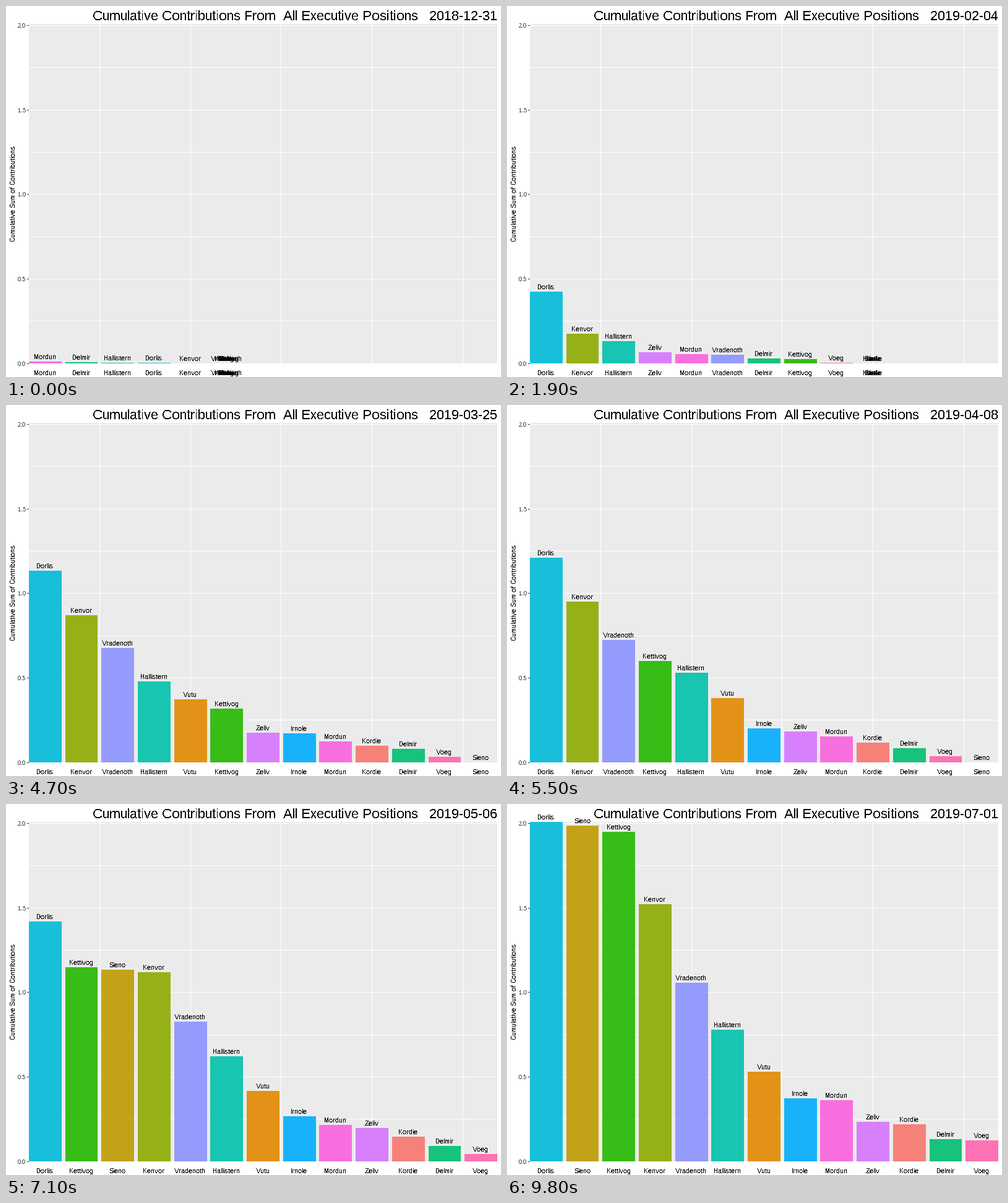
A matplotlib script that plays this animation: 800x600 px, repeating every 10000 ms.

```python
import numpy as np
import matplotlib.pyplot as plt
from matplotlib.animation import FuncAnimation
from matplotlib.patches import Rectangle

plt.rcParams.update({
    "font.family": "Liberation Sans",
    "text.hinting": "native",
    "text.hinting_factor": 1,
    "text.kerning_factor": 6,
    "text.antialiased": False,
    "toolbar": "None",
})

W, H, DPI = 800, 600, 72
LEFT, RIGHT, TOP, BASE = 37, 794, 29, 578
UNIT_X = (RIGHT - LEFT) / 12.9
UNIT_Y = 273.45
LAST_WEEK = 26

# Totals at a few key weeks, in drawing order.
KEY_WEEKS = (0, 5, 8, 12, 16, 22, 25)
CANDIDATES = {
    "Kordie": ("#F8766D", (0, 0, .049, .099, .135, .169, .220)),
    "Vutu": ("#E18A00", (0, 0, 0, .373, .391, .472, .531)),
    "Sieno": ("#BE9C00", (0, 0, 0, 0, .661, 1.548, 1.986)),
    "Kenvor": ("#8CAB00", (.001, .176, .446, .870, 1.035, 1.287, 1.521)),
    "Kettivog": ("#24B700", (0, .026, .062, .318, .903, 1.566, 1.950)),
    "Delmir": ("#00BE70", (.008, .030, .048, .081, .088, .103, .131)),
    "Hallistern": ("#00C1AB", (.004, .132, .249, .480, .581, .706, .780)),
    "Dorlis": ("#00BBDA", (.003, .424, .637, .1134 * 10, 1.291, 1.683, 2.008)),
    "Irnole": ("#00ACFC", (0, 0, .102, .172, .230, .339, .373)),
    "Vradenoth": ("#8B93FF", (0, .052, .370, .677, .775, .933, 1.057)),
    "Zeliv": ("#D575FE", (0, .066, .084, .175, .190, .215, .234)),
    "Mordun": ("#F962DD", (.011, .055, .083, .124, .186, .281, .362)),
    "Voeg": ("#FF65AC", (0, .003, .011, .033, .040, .077, .124)),
}

# Weeks where a campaign launches or its pace turns.
TURNS = {
    "Kordie": {6: 0, 7: .03},
    "Vutu": {9: 0, 10: .22},
    "Sieno": {15: 0, 17: .89, 18: 1.135, 23: 1.67, 24: 1.78},
    "Kenvor": {3: .01, 4: .08},
    "Kettivog": {2: 0, 9: .08, 10: .17, 11: .24, 13: .46, 14: .6, 15: .76,
                 17: 1.03, 18: 1.15, 23: 1.66, 24: 1.79},
    "Hallistern": {1: .01, 2: .06},
    "Dorlis": {2: .015, 3: .17, 4: .33},
    "Irnole": {6: .01, 7: .06},
    "Vradenoth": {4: 0},
    "Voeg": {10: .015, 18: .044, 19: .055, 20: .062, 21: .066},
}


def weekly_totals(name):
    points = dict(zip(KEY_WEEKS, CANDIDATES[name][1])) | TURNS.get(name, {})
    weeks = sorted(points)
    return np.interp(range(LAST_WEEK + 1), weeks, [points[w] for w in weeks])


totals = np.array([weekly_totals(name) for name in CANDIDATES])
# Ties share the best rank.
ranks = 1 + (totals[None] > totals[:, None] + 1e-9).sum(axis=1)

# Each state rests two or three frames, with one halfway frame in between.
schedule = []
for week in range(LAST_WEEK + 1):
    schedule += [week] * (2 if week == 0 or week > 20 else 3)
    if week < LAST_WEEK:
        schedule.append(week + .5)


def to_x(rank):
    return LEFT + (rank - .55) * UNIT_X


def to_y(value):
    return BASE + .3 - UNIT_Y * value


def at(table, week):
    low, high = int(np.floor(week)), int(np.ceil(week))
    return (table[:, low] + table[:, high]) / 2


fig = plt.figure(figsize=(W / DPI, H / DPI), dpi=DPI, facecolor="white")
ax = fig.add_axes([0, 0, 1, 1])
ax.set(xlim=(0, W), ylim=(H, 0))
ax.axis("off")


def box(x, y, w, h, color, z, **kw):
    return ax.add_patch(Rectangle((x, y), w, h, facecolor=color, lw=0,
                                  antialiased=False, zorder=z, **kw))


def label(x, y, s, size=11, ha="center", color="black", **kw):
    return ax.text(x, y, s, fontsize=size, ha=ha, va=kw.pop("va", "baseline"),
                   color=color, zorder=5, **kw)


box(LEFT, TOP, RIGHT - LEFT, BASE - TOP, "#EBEBEB", 0)
for rank in (2.5, 5, 7.5, 10, 12.5):
    box(int(to_x(rank)), TOP, 1, BASE - TOP, "white", 1)
for step in range(9):
    value = step / 4
    y = int(to_y(value))
    if step:
        box(LEFT, y, RIGHT - LEFT, 1, "white", 1)
    if step % 2 == 0:
        box(LEFT - 3, y, 3, 1, "#333333", 1)
        label(32, y + 4, f"{value:.1f}", 9, "right", "#4D4D4D")
label(12, 303.5, "Cumulative Sum of Contributions", rotation=90, va="center")
title = label(RIGHT, 23, "", 22, "right")

bars, upper, lower = [], [], []
for name, (color, _) in CANDIDATES.items():
    bars.append(box(0, BASE, .9 * UNIT_X, 0, color, 2, alpha=.9))
    upper.append(label(0, 0, name))
    lower.append(label(0, 597, name))


def update(frame):
    week = schedule[frame]
    day = np.datetime64("2018-12-31") + 7 * int(week)
    title.set_text("Cumulative Contributions From  All Executive Positions"
                   f"   {day}")
    for i, (rank, value) in enumerate(zip(at(ranks, week), at(totals, week))):
        x, y = to_x(rank), to_y(value)
        left, right = round(x - .45 * UNIT_X), round(x + .45 * UNIT_X)
        bars[i].set_bounds(left, round(y), right - left, BASE - round(y))
        upper[i].set_position((x - .5, y - 4))
        lower[i].set_x(x - .5)
    return [title, *bars, *upper, *lower]


anim = FuncAnimation(fig, update, frames=len(schedule), interval=100,
                     repeat=True, repeat_delay=0, blit=False)
plt.show()
```
